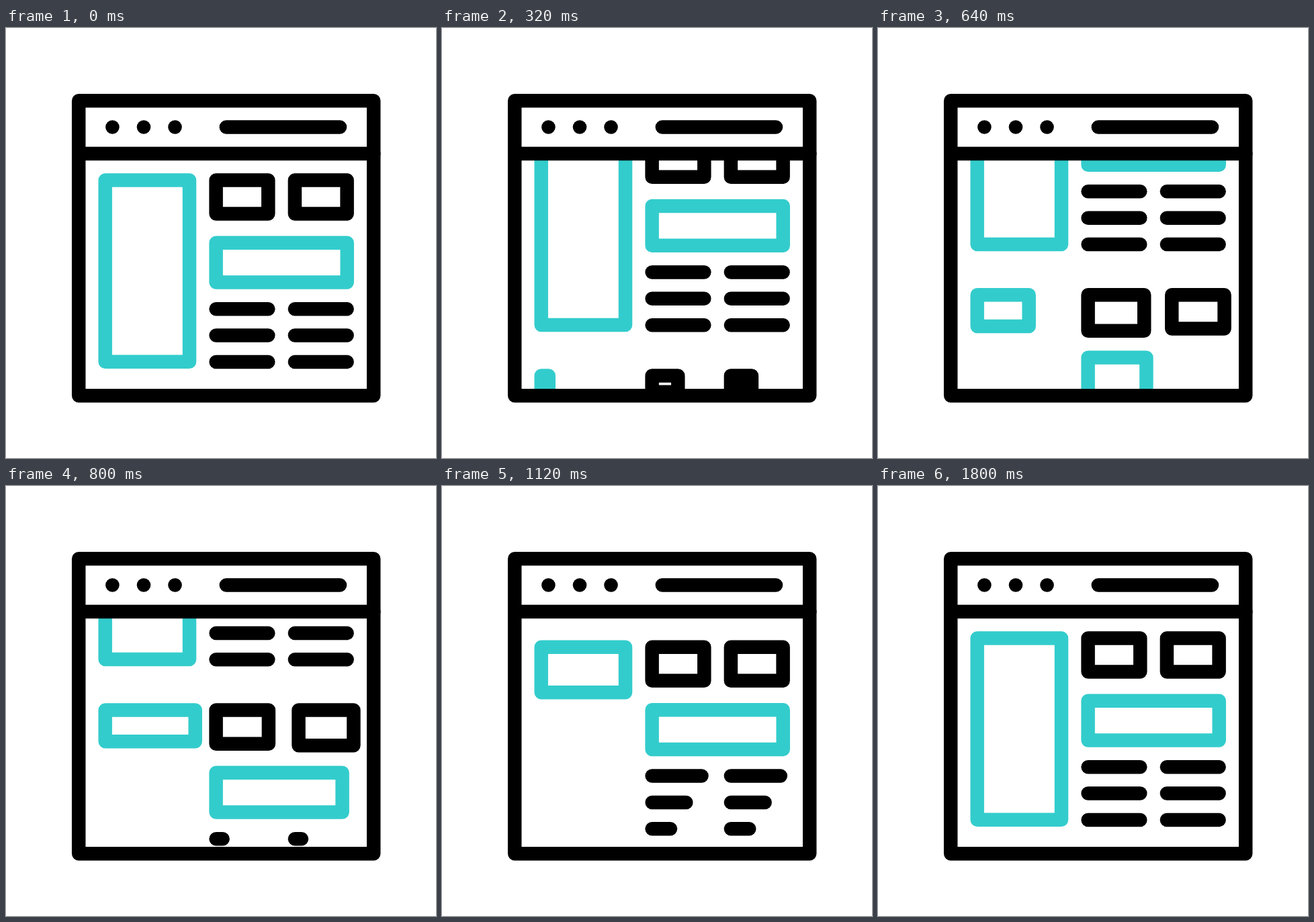
Recreate the animation shown at these times as an HTML page. Size 640x640 px, loop 2.02 s.

```html
<!DOCTYPE html>
<html lang="en">
<head>
<meta charset="utf-8">
<title>Page scroll icon</title>
<style>
  html, body { margin: 0; width: 100%; height: 100%; overflow: hidden; background: #fff; }
  svg { display: block; width: 100vw; height: 100vh; }
  svg * { fill: none; stroke: #000; stroke-width: 20.5; stroke-linecap: round; stroke-linejoin: round; }
  svg .teal { stroke: #33cccc; }
  svg .dot { fill: #000; stroke: none; }
</style>
</head>
<body>
<svg viewBox="0 0 640 640">
  <clipPath id="view"><rect x="108" y="187" width="439" height="360"/></clipPath>
  <g clip-path="url(#view)"><g id="old"></g><g id="fresh"></g></g>
  <rect x="108.2" y="108.3" width="439" height="439"/>
  <path d="M108.2 187H547.4M327.8 147.5H497"/>
  <circle class="dot" cx="158.4" cy="147.5" r="10.3"/>
  <circle class="dot" cx="205" cy="147.5" r="10.3"/>
  <circle class="dot" cx="251.5" cy="147.5" r="10.3"/>
</svg>
<script>
const LOOP = 2020, STEP = 20;
const SCROLL = 345.7, SCROLL_MS = 1270;
const COL1 = 312.6, COL2 = 429.9, TOP = 226.5;

const clamp = v => Math.min(1, Math.max(0, v));
const ease = v => { v = clamp(v); return v * v * (3 - 2 * v); };

// Value along [time, value] keys, eased between neighbours.
function track(keys, t) {
  let value = keys[0][1];
  for (let i = 1; i < keys.length; i++) {
    const [t0, v0] = keys[i - 1], [t1, v1] = keys[i];
    if (t >= t0) value = v0 + (v1 - v0) * ease((t - t0) / (t1 - t0));
  }
  return value;
}

const still = v => [[0, v]];
// Grow from one size past the final one, then settle.
const spring = (start, peak, end, from, over, to) => [[start, from], [peak, over], [end, to]];

const box = (teal, x, y, w, h) => ({ teal, x, y: still(y), w, h });
const parts = [
  box(true, still(147.7), TOP, spring(433, 833, 1067, 11, 136.4, 125.3),
    spring(1067, 1367, 1600, 46.7, 296.7, 270.3)),
  box(false, still(COL1), TOP, spring(243, 567, 850, 31, 84.8, 77.7),
    spring(243, 567, 850, 19.4, 54.2, 50)),
  box(false, spring(400, 700, 967, COL2, COL2 + 8.2, COL2), TOP,
    spring(400, 700, 967, 31, 83.8, 77.7), spring(400, 700, 967, 19.4, 53.9, 50)),
  box(true, still(COL1), 319.8, spring(470, 893, 1093, 18, 212, 195.1), still(58.8)),
];
for (let row = 0; row < 3; row++) {
  const start = 767 + row * 100;
  const w = spring(start, start + 500, start + 833, 9, 91, 77.7);
  for (const x of [COL1, COL2]) parts.push(box(false, still(x), 418.2 + row * 39.4, w, null));
}

function build(group) {
  return parts.map(p => {
    const el = document.createElementNS("http://www.w3.org/2000/svg", "path");
    if (p.teal) el.setAttribute("class", "teal");
    group.append(el);
    return el;
  });
}

function pose(els, t) {
  parts.forEach((p, i) => {
    const x = track(p.x, t), y = track(p.y, t), w = track(p.w, t);
    const rest = p.h ? `v${track(p.h, t)}h${-w}z` : "";
    els[i].setAttribute("d", `M${x} ${y}h${w}${rest}`);
  });
}

const old = document.getElementById("old");
const fresh = document.getElementById("fresh");
const freshParts = build(fresh);
pose(build(old), LOOP);

function draw(t) {
  const shift = SCROLL * ease(t / SCROLL_MS);
  old.setAttribute("transform", `translate(0 ${-shift})`);
  fresh.setAttribute("transform", `translate(0 ${SCROLL - shift})`);
  pose(freshParts, t);
}

const begin = performance.now();
function tick() {
  const t = (performance.now() - begin) % LOOP;
  draw(Math.floor(t / STEP) * STEP);
  requestAnimationFrame(tick);
}
draw(0);
requestAnimationFrame(tick);
</script>
</body>
</html>
```
